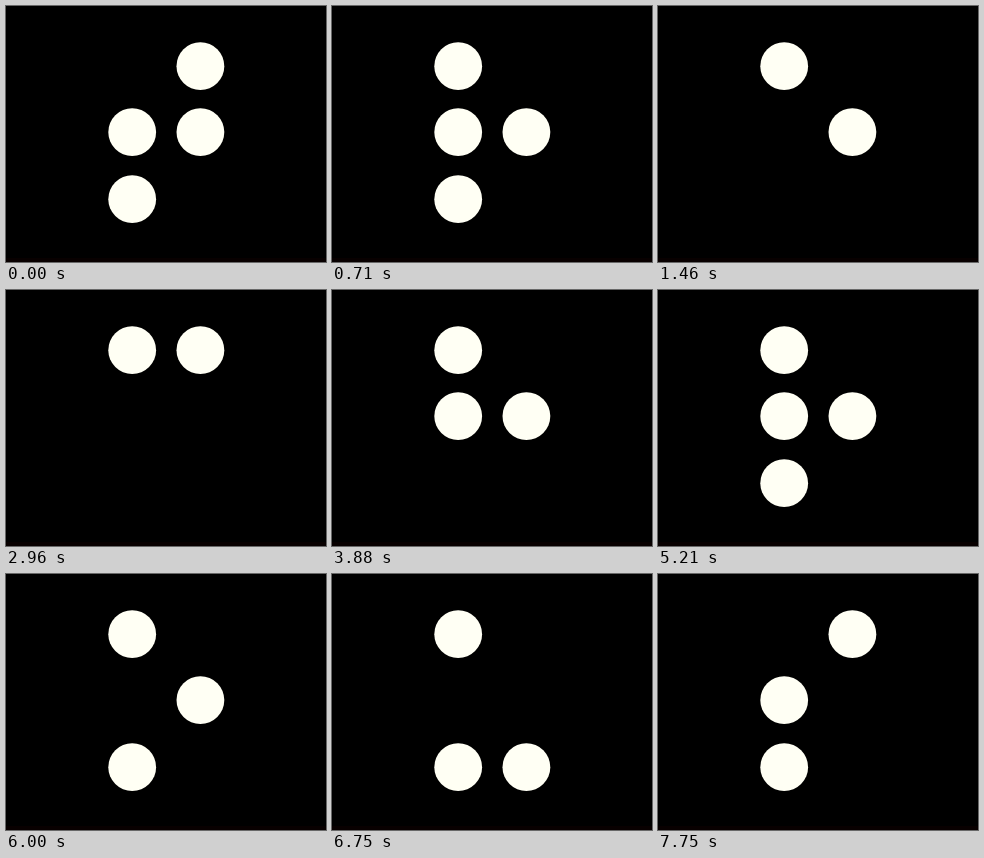
Animation of 320 by 256 pixels, one loop 8000 ms. Source, as an HTML page:

```html
<!DOCTYPE html>
<html lang="en">
<head>
<meta charset="utf-8">
<title>Braille letters</title>
<style>
  html, body { margin: 0; width: 100%; height: 100%; overflow: hidden; background: #000; }
  svg { display: block; width: 100%; height: 100%; }
  circle { fill: #fffff4; animation: 8s step-end infinite; }

  /* One cell spells T R E A C H E R O U S, a letter every 750 ms */
  #d1 { animation-name: dot1; }
  #d2 { animation-name: dot2; }
  #d3 { animation-name: dot3; }
  #d4 { animation-name: dot4; }
  #d5 { animation-name: dot5; }
  #d6 { animation-name: dot6; }

  @keyframes dot1 {
    0%, 93.25%, 100% { opacity: 0; }
    8.875% { opacity: 1; }
  }
  @keyframes dot2 {
    0%, 46.375%, 65.125%, 93.25%, 100% { opacity: 1; }
    18.25%, 55.75%, 74.5% { opacity: 0; }
  }
  @keyframes dot3 {
    0%, 65.125%, 100% { opacity: 1; }
    18.25% { opacity: 0; }
  }
  @keyframes dot4 {
    0%, 37%, 93.25%, 100% { opacity: 1; }
    8.875%, 46.375% { opacity: 0; }
  }
  @keyframes dot5 {
    0%, 46.375%, 100% { opacity: 1; }
    27.625%, 83.875% { opacity: 0; }
  }
  @keyframes dot6 {
    0%, 93.25%, 100% { opacity: 0; }
    83.875% { opacity: 1; }
  }
</style>
</head>
<body>
<svg viewBox="0 0 320 256">
  <rect y="252" width="320" height="4" fill="#080000"/>
  <circle id="d1" cx="126.2" cy="60.2" r="23.9"/>
  <circle id="d2" cx="126.2" cy="126.1" r="23.9"/>
  <circle id="d3" cx="126.2" cy="193.2" r="23.9"/>
  <circle id="d4" cx="194.4" cy="60.2" r="23.9"/>
  <circle id="d5" cx="194.4" cy="126.1" r="23.9"/>
  <circle id="d6" cx="194.4" cy="193.2" r="23.9"/>
</svg>
</body>
</html>
```
